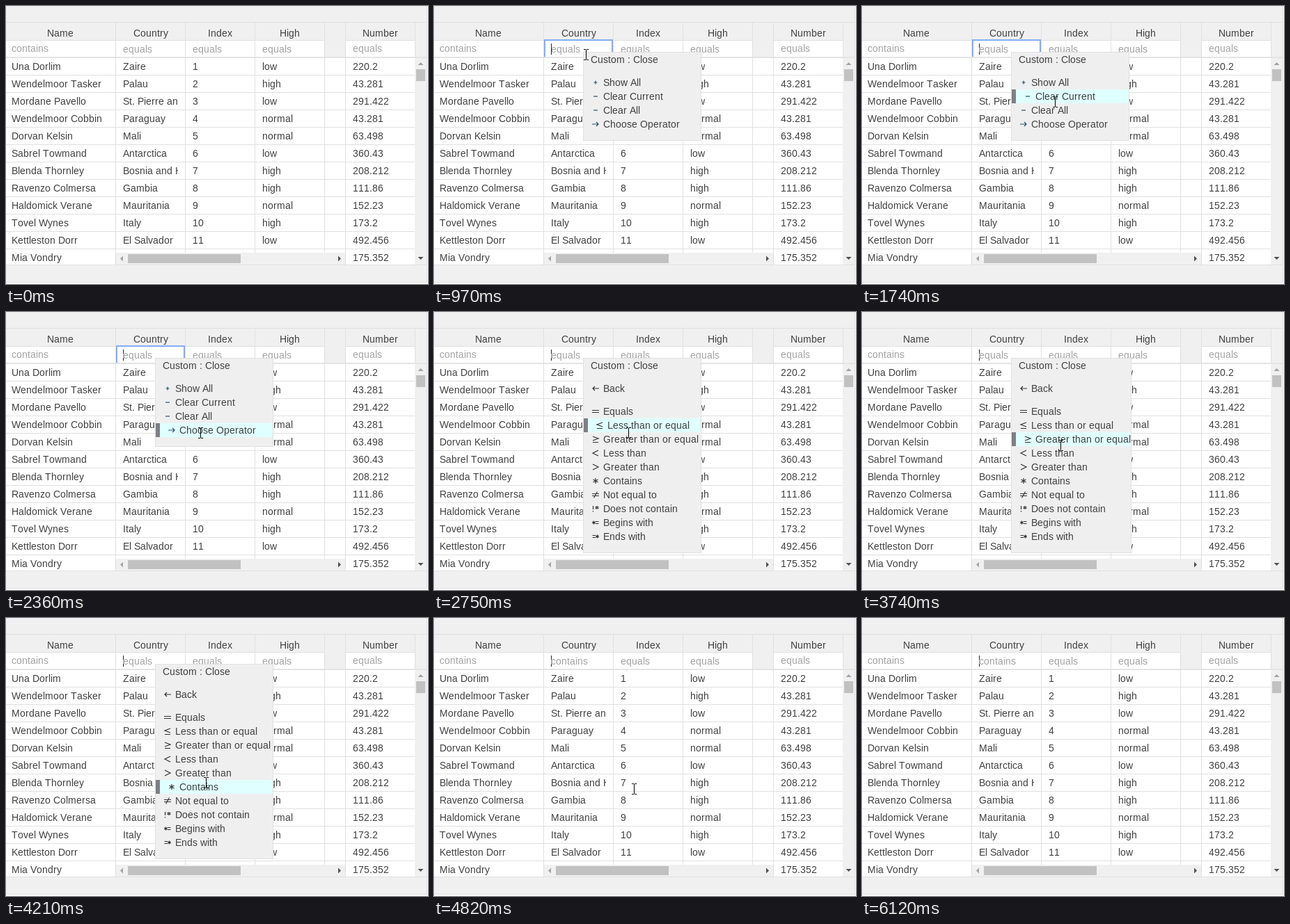
Recreate the animation shown at these times as an HTML page. Size 606x400 px, loop 6.99 s.

```html
<!DOCTYPE html>
<html lang="en">
<head>
<meta charset="utf-8">
<title>Grid filter menu</title>
<style>
  html, body { margin: 0; width: 100%; height: 100%; overflow: hidden; background: #fff; }
  svg { display: block; }
  text { font: 14px "Liberation Sans", Arial, sans-serif; fill: #404040; }
  .hint { fill: #a2a2a2; }
  .line { fill: #e0e0e0; }
  .panel { fill: #f0f0f0; }
  .thumb { fill: #c1c1c1; }
  .icon { fill: none; stroke: #333; stroke-width: 1.2; }
  .blue .icon { stroke: #24506b; }
</style>
</head>
<body>
<svg id="stage" width="606" height="400" viewBox="0 0 606 400"></svg>
<script>
const LOOP = 6990;
const stage = document.getElementById('stage');
const ruler = document.createElement('canvas').getContext('2d');
ruler.font = '14px "Liberation Sans", Arial, sans-serif';

function add(parent, tag, attrs = {}) {
  const el = document.createElementNS('http://www.w3.org/2000/svg', tag);
  for (const k in attrs) el.setAttribute(k, attrs[k]);
  return parent.appendChild(el);
}
const group = (parent, attrs) => add(parent, 'g', attrs);
const rect = (parent, x, y, width, height, attrs) => add(parent, 'rect', { x, y, width, height, ...attrs });
const show = (el, on) => el.setAttribute('visibility', on ? 'inherit' : 'hidden');

// Letters advance by whole pixels, as in hinted text.
function text(parent, x, y, str, attrs) {
  const xs = [];
  for (const ch of str) {
    xs.push(x);
    x += Math.round(ruler.measureText(ch).width);
  }
  const el = add(parent, 'text', { x: xs.join(' '), y, ...attrs });
  el.textContent = str;
  return el;
}

// ---- table ----
const panel = { class: 'panel' }, line = { class: 'line' }, hint = { class: 'hint' };
const people = ['Una Dorlim', 'Wendelmoor Tasker', 'Mordane Pavello', 'Wendelmoor Cobbin',
  'Dorvan Kelsin', 'Sabrel Towmand', 'Blenda Thornley', 'Ravenzo Colmersa',
  'Haldomick Verane', 'Tovel Wynes', 'Kettleston Dorr', 'Mia Vondry'];
const countries = ['Zaire', 'Palau', 'St. Pierre and Miquelon', 'Paraguay', 'Mali', 'Antarctica',
  'Bosnia and Herzegovina', 'Gambia', 'Mauritania', 'Italy', 'El Salvador'];
const levels = 'low high low normal normal low high high normal high low'.split(' ');
const numbers = ['220.2', '43.281', '291.422', '43.281', '63.498', '360.43', '208.212',
  '111.86', '152.23', '173.2', '492.456', '175.352'];

rect(stage, 0, 0, 605, 398, panel);
rect(stage, 0, 50, 587, 322, { fill: '#fff' });
for (let y = 99; y < 372; y += 25) rect(stage, 0, y, 587, 1, line);
rect(stage, 458, 24, 29, 50, panel);
rect(stage, 0, 23, 605, 1, line);
rect(stage, 0, 49, 457, 1, line);
rect(stage, 488, 49, 99, 1, line);
rect(stage, 0, 73, 604, 2, { fill: '#e4e4e4' });
for (const x of [157, 257, 357, 457, 487]) rect(stage, x, 24, 1, 348, line);
rect(stage, 587, 24, 1, 50, line);
rect(stage, 0, 372, 605, 1, line);
rect(stage, 0, 397, 605, 1, line);
rect(stage, 604, 0, 1, 398, line);

[['Name', 59], ['Country', 183], ['Index', 290], ['High', 393], ['Number', 512]]
  .forEach(([label, x]) => text(stage, x, 44, label));
text(stage, 8, 66, 'contains', hint);
text(stage, 268, 67, 'equals', hint);
text(stage, 368, 67, 'equals', hint);
text(stage, 498, 66, 'equals', hint);
const before = text(stage, 168, 67, 'equals', hint);
const after = text(stage, 168, 67, 'contains', hint);

rect(add(stage, 'clipPath', { id: 'cell' }), 168, 75, 79, 280);
rect(add(stage, 'clipPath', { id: 'rows' }), 0, 75, 604, 297);
const rows = group(stage, { 'clip-path': 'url(#rows)' });
const places = group(rows, { 'clip-path': 'url(#cell)' });
people.forEach((name, i) => {
  const y = 92 + 25 * i;
  text(rows, 8, y, name);
  text(rows, 498, y, numbers[i]);
  if (i === 11) return;
  text(places, 168, y, countries[i]);
  text(rows, 268, y, String(i + 1));
  text(rows, 368, y, levels[i]);
});

// ---- scrollbars ----
const arrow = (d, fill) => add(stage, 'path', { d, fill });
rect(stage, 587, 75, 17, 297, panel);
rect(stage, 589, 91, 13, 17, { class: 'thumb' });
arrow('M591.5 85h8l-4-4z', '#a3a3a3');
arrow('M591.5 361h8l-4 4z', '#505050');
rect(stage, 158, 355, 329, 17, panel);
rect(stage, 175, 357, 162, 13, { class: 'thumb' });
arrow('M168 359.5v8l-4-4z', '#a3a3a3');
arrow('M477 359.5v8l4-4z', '#505050');

// ---- focus ring and caret ----
const ring = add(stage, 'path', { d: 'M159 73V49H256V73', fill: 'none', stroke: '#83adf4', 'stroke-width': 2 });
const caret = rect(stage, 168, 54, 1, 16, { fill: '#222' });
const caretGap = rect(stage, 168, 60, 1, 6, { fill: '#b4b4b4' });

// ---- menus ----
const icons = {
  plus: 'M-2.5 0h5M0-2.5v5',
  minus: 'M-3 0h6',
  right: 'M-5 0h9M1-3l3 3l-3 3',
  left: 'M5 0h-9M-1-3l-3 3l3 3',
  eq: 'M-5-1.5h10M-5 1.5h10',
  le: 'M4-4l-8 3l8 3M-4 4.5h8',
  ge: 'M-4-4l8 3l-8 3M-4 4.5h8',
  lt: 'M4-4l-8 4l8 4',
  gt: 'M-4-4l8 4l-8 4',
  any: 'M0-4v8M-3.5-2l7 4M-3.5 2l7-4',
  ne: 'M-5-1.5h10M-5 1.5h10M2.5-4.5l-5 9',
  none: 'M-3.5-4v5M-3.5 3v1.5M2-4v5M-.5-2.7l5 2.5M-.5-.2l5-2.5',
  begins: 'M-2.5-2.5v5M-4.7-1.2l4.4 2.4M-4.7 1.2l4.4-2.4M0-1.5h4.5M0 1.5h4.5',
  ends: 'M2.5-2.5v5M.3-1.2l4.4 2.4M.3 1.2l4.4-2.4M-4.5-1.5h4.5M-4.5 1.5h4.5'
};

function makeMenu(height, items, attrs) {
  const root = group(stage, attrs);
  const box = rect(root, 214.5, 66.5, 169, height - 1, { fill: '#efefef', stroke: '#e0e0e0' });
  text(root, 225, 82, 'Custom : Close');
  const list = items.map(([icon, label, y]) => {
    const lit = group(root);
    const back = rect(lit, 215, y - 10, 168, 20, { fill: '#e0ffff' });
    rect(lit, 215, y - 10, 6, 20, { fill: '#7f8085' });
    const body = group(root);
    add(body, 'path', { d: icons[icon], class: 'icon', transform: `translate(232 ${y})` });
    text(body, 243, y + 5, label);
    return { y, lit, back, body, wide: icon === 'ge' };
  });
  return { root, box, list };
}

const mainMenu = makeMenu(128, [
  ['plus', 'Show All', 110], ['minus', 'Clear Current', 130],
  ['minus', 'Clear All', 150], ['right', 'Choose Operator', 170]
], { class: 'blue' });
const operators = [['eq', 'Equals'], ['le', 'Less than or equal'], ['ge', 'Greater than or equal'],
  ['lt', 'Less than'], ['gt', 'Greater than'], ['any', 'Contains'], ['ne', 'Not equal to'],
  ['none', 'Does not contain'], ['begins', 'Begins with'], ['ends', 'Ends with']];
const operatorMenu = makeMenu(281, [['left', 'Back', 110],
  ...operators.map(([icon, label], i) => [icon, label, 143 + 20 * i])]);

function drawMenu(menu, open, [x, y]) {
  show(menu.root, open);
  let grow = 0;
  for (const item of menu.list) {
    const over = x > 211 && y + 6 >= item.y - 10 && y + 6 < item.y + 10;
    show(item.lit, over);
    item.body.setAttribute('transform', `translate(${over ? 6 : 0} 0)`);
    if (over && item.wide) grow = 3;
    item.back.setAttribute('width', 168 + grow);
  }
  menu.box.setAttribute('width', 169 + grow);
}

// ---- pointer ----
const pointer = add(stage, 'path', {
  d: 'M0 .5h3M4 .5h3M3.5 1v14M0 15.5h3M4 15.5h3', fill: 'none', stroke: '#000'
});

// start, end, steps, then the first, control and last point of a curve
const moves = [
  [130, 510, 6, 466, 324, 290, 90, 215, 62],
  [1430, 1740, 5, 216, 63, 255, 78, 274, 130],
  [1820, 2120, 5, 275, 140, 279, 160, 276, 166],
  [3140, 3590, 7, 276, 167, 278, 174, 282, 183],
  [3740, 4280, 8, 282, 184, 284, 205, 284, 238],
  [4990, 5140, 3, 284, 237, 284, 236, 284, 235],
  [5290, 5740, 7, 283, 231, 262, 160, 220, 106],
  [5820, 5970, 3, 222, 109, 227, 118, 234, 130],
  [6050, 6050, 1, 389, 296, 389, 296, 389, 296]
];

function pointerAt(t) {
  const move = moves.filter(m => m[0] <= t).pop() || moves[0];
  const [start, end, steps, x0, y0, x1, y1, x2, y2] = move;
  const last = Math.max(1, steps - 1);
  const k = end > start ? Math.floor((t - start) / (end - start) * last + 1e-6) : last;
  const u = Math.min(1, k / last), v = 1 - u;
  const bend = (a, b, c) => Math.round(v * v * a + 2 * u * v * b + u * u * c);
  return [bend(x0, x1, x2), bend(y0, y1, y2)];
}

function render(t) {
  const within = (a, b) => t >= a && t < b;
  const spot = pointerAt(t);
  show(pointer, within(130, 6120));
  pointer.setAttribute('transform', `translate(${spot})`);
  show(before, t < 4820);
  show(after, t >= 4820);
  show(ring, within(750, 2600));
  show(caret, t >= 750);
  show(caretGap, within(1280, 1810) || t >= 2360);
  drawMenu(mainMenu, within(890, 2750), spot);
  drawMenu(operatorMenu, within(2750, 4820), spot);
}

function tick(now) {
  render(now % LOOP);
  requestAnimationFrame(tick);
}
render(0);
requestAnimationFrame(tick);
</script>
</body>
</html>
```
